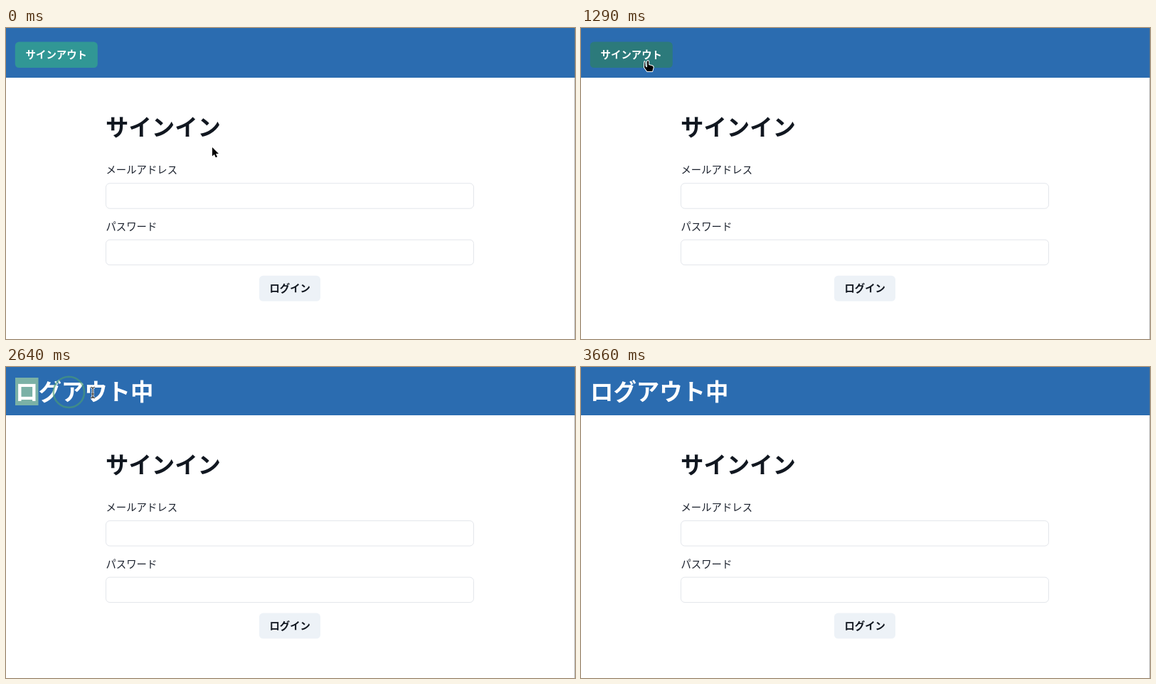
Animation, 800 px wide and 438 px high, one loop 3870 ms. Source, as an HTML page:

```html
<!DOCTYPE html>
<html lang="ja">
<head>
<meta charset="utf-8">
<style>
  html, body { margin: 0; width: 100%; height: 100%; overflow: hidden; background: #fff; }
  svg { display: block; }
  text { font: 700 14.4px "Noto Sans CJK JP", "Noto Sans CJK", sans-serif; fill: #111720; }
  .title { font-size: 32.4px; }
  .label { font-weight: 300; fill: #1a202c; }
  .light { fill: #fff; }
  .field { fill: #fff; stroke: #e3e6eb; }
  .pointer { fill: #000; stroke: #fff; stroke-linejoin: round; paint-order: stroke; }
</style>
</head>
<body>
<svg width="800" height="438" viewBox="0 0 800 438">
  <rect id="header" width="800" height="70" fill="#2b6cb0"/>
  <g id="signOut">
    <rect id="signOutBox" x="12.8" y="19.6" width="116" height="36.4" rx="5.4"/>
    <text class="light" x="27.6" y="43.2">サインアウト</text>
  </g>
  <g id="signingOut">
    <rect id="selection" x="13" y="15" height="39" fill="#7bb1a6"/>
    <text class="title light" x="13" y="46.6">ログアウト中</text>
  </g>
  <g id="form">
    <text class="title" x="140" y="152.4">サインイン</text>
    <text class="label" x="140.4" y="205.2">メールアドレス</text>
    <rect class="field" x="140.5" y="218.8" width="517" height="35.4" rx="5.4"/>
    <text class="label" x="140.4" y="285">パスワード</text>
    <rect class="field" x="140.5" y="298.3" width="517" height="35.4" rx="5.4"/>
    <rect x="356" y="348.8" width="86" height="36" rx="5.4" fill="#edf2f7"/>
    <text x="370.4" y="372">ログイン</text>
  </g>
  <rect x="799" width="1" height="438" fill="#777" opacity=".5"/>
  <circle id="ring" fill="none" stroke="#4b9d74" stroke-width="2.6"/>
  <g id="cursor">
    <path id="arrow" class="pointer" stroke-width="2" d="M0 0V12.6L2.9 9.9 4.8 14.3 7 13.4 5.1 9.1H9Z"/>
    <path id="hand" class="pointer" stroke-width="2" d="M-1 0Q0-1.5 1.2 0V5L6 6.2Q8 7 7.6 9L6.2 14H-1L-5 8.5Q-5-7.5-3.5 7L-1 8.5Z"/>
    <g id="beam" fill="none">
      <path stroke="#fff" stroke-width="3" d="M-3-7.5Q0-7.5 0-5.5Q0-7.5 3-7.5M0-5.5V5.5M-3 7.5Q0 7.5 0 5.5Q0 7.5 3 7.5M-2 2H2"/>
      <path stroke="#222" stroke-width="1.1" d="M-3-7.5Q0-7.5 0-5.5Q0-7.5 3-7.5M0-5.5V5.5M-3 7.5Q0 7.5 0 5.5Q0 7.5 3 7.5M-2 2H2"/>
    </g>
  </g>
</svg>
<script>
const LOOP = 3870, STEP = 30, SWITCH = 1650, RING_FADE = 250;
const $ = id => document.getElementById(id);
const show = (id, on) => $(id).setAttribute('visibility', on ? 'visible' : 'hidden');
const set = (id, attrs) => {
  for (const name in attrs) $(id).setAttribute(name, attrs[name]);
};
const clamp = v => Math.max(0, Math.min(1, v));
const mix = (a, b, k) => a + (b - a) * k;

// time, x, y
const path = [
  [0, 290, 168], [390, 290, 168], [600, 215, 142], [840, 112, 100],
  [1020, 94, 47], [1770, 94, 47], [2160, 38, 36], [2280, 38, 36],
  [2430, 26, 35], [2520, 28, 35], [2580, 66, 35], [2640, 122, 36],
  [2760, 222, 36], [2850, 252, 36], [3270, 252, 36], [3420, 270, 130], [3600, 300, 455]
];
// press and release times
const presses = [[1440, 1560], [2480, 3100], [3180, 3250]];

function position(t) {
  const i = path.findIndex(p => p[0] > t);
  if (i < 0) return path.at(-1).slice(1);
  const [t0, x0, y0] = path[i - 1], [t1, x1, y1] = path[i];
  const k = (t - t0) / (t1 - t0);
  return [mix(x0, x1, k), mix(y0, y1, k)];
}

function ringStrength(t) {
  return Math.max(...presses.map(([down, up]) =>
    Math.min(clamp((t - down) / RING_FADE), clamp(1 - (t - up) / RING_FADE))));
}

function draw(t) {
  const switched = t >= SWITCH;
  const [x, y] = position(t);
  const overButton = !switched && x < 129 && y < 56;
  const overText = switched && x < 210;

  set('header', { height: switched ? 68 : 70 });
  set('form', { transform: `translate(0 ${switched ? -2.2 : 0})` });
  show('signOut', !switched);
  const hover = clamp((t - 990) / 200);
  const channels = [[49, 44], [151, 122], [149, 123]].map(([a, b]) => mix(a, b, hover));
  set('signOutBox', { fill: `rgb(${channels})` });

  show('signingOut', switched);
  const selecting = t >= 2480 && t < 3180;
  const letters = selecting ? Math.round((position(t - 80)[0] - 13) / 32.5) : 0;
  set('selection', { width: 32.5 * Math.max(0, Math.min(6, letters)) });

  set('cursor', { transform: `translate(${x} ${y})` });
  show('hand', overButton);
  show('beam', overText);
  show('arrow', !overButton && !overText);

  const strength = ringStrength(t);
  const [ringX, ringY] = position(Math.max(0, t - 36));
  set('ring', { cx: ringX, cy: ringY, r: 29 - 11.5 * strength, opacity: strength });
}

function frame() {
  const t = performance.now() % LOOP;
  draw(Math.floor(t / STEP) * STEP);
  requestAnimationFrame(frame);
}
frame();
</script>
</body>
</html>
```
